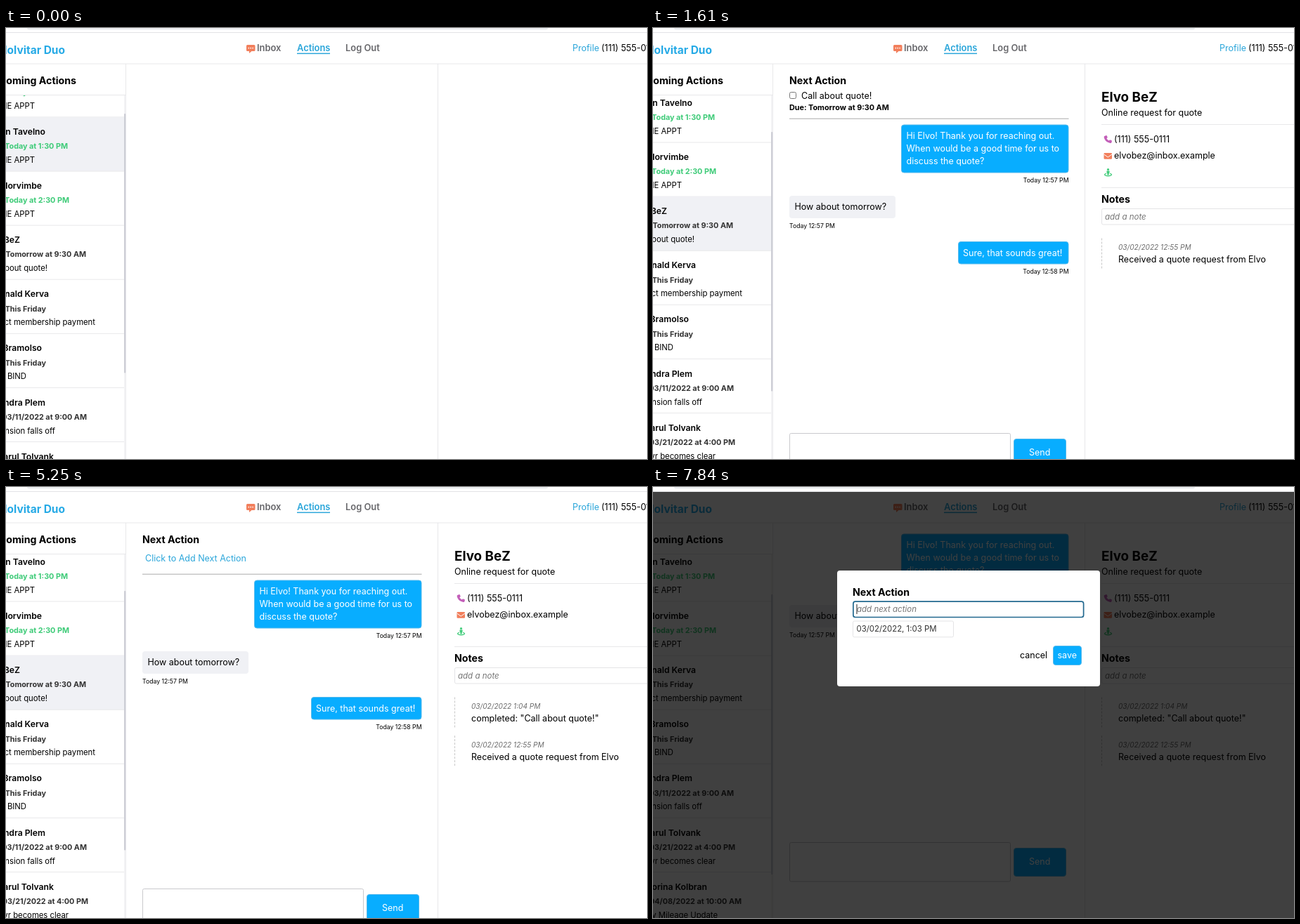
Recreate the animation shown at these times as an HTML page. Size 912 by 614 pixels, loop 8000 ms.

```html
<!DOCTYPE html>
<html lang="en">
<head>
<meta charset="utf-8">
<title>Upcoming actions</title>
<style>
  html, body { margin: 0; width: 100%; height: 100%; overflow: hidden; background: #fff; }
  svg { display: block; width: 912px; height: 614px; font: 12.5px Inter, sans-serif; }
  .nav { font-size: 12.9px; font-weight: 600; fill: #68686c; }
  .brand { font-size: 15.5px; font-weight: 700; fill: #26aae6; }
  .head { font-size: 14.2px; font-weight: 700; }
  .contact { font-size: 18.8px; font-weight: 700; }
  .name { font-size: 12.2px; font-weight: 600; }
  .due { font-size: 10.8px; font-weight: 700; fill: #333; }
  .today { fill: #3ecb78; }
  .memo { font-size: 11.3px; }
  .deadline { font-size: 10.8px; font-weight: 700; }
  .time { font-size: 8.7px; }
  .hint { font-size: 11.5px; font-style: italic; fill: #757575; }
  .date { font-size: 10.1px; font-style: italic; fill: #6c6c6c; }
  .field { font-size: 11.4px; fill: #333; }
  .link { fill: #2ba6da; }
  .white { fill: #fff; }
  .end { text-anchor: end; }
</style>
</head>
<body>
<svg id="stage" viewBox="0 0 912 614"></svg>
<script>
const LOOP = 8000, STEP = 70, PITCH = 77.1;
const BLUE = '#08adff', EDGE = '#55b9ec', PALE = '#f0f1f5', FOCUS = '#23698f', RULE = '#e8e8ea';

// name, due, memo, each followed by its right edge
const actions = [
  ['Olma Reskin', 50, 'Today at 11:00 AM', 94, 'PHONE APPT', 41],
  ['Mirun Tavelno', 56, 'Today at 1:30 PM', 88, 'PHONE APPT', 41],
  ['Ada Norvimbe', 51, 'Today at 2:30 PM', 90, 'PHONE APPT', 41],
  ['Elvo BeZ', 20, 'Tomorrow at 9:30 AM', 114, 'Call about quote!', 59],
  ['Jornald Kerva', 61, 'This Friday', 57, 'Collect membership payment', 127],
  ['Tia Bramolso', 51, 'This Friday', 57, 'READY TO BIND', 29],
  ['Pelondra Plem', 56, '03/11/2022 at 9:00 AM', 115, 'Suspension falls off', 70],
  ['Karul Tolvank', 68, '03/21/2022 at 4:00 PM', 117, 'When mvr becomes clear', 89],
  ['Sorina Kolbran', 77, '04/08/2022 at 10:00 AM', 126, 'Yearly Mileage Update', 92]
];
const CALL = 3;

const text = (x, y, s, cls = '') => `<text x="${x}" y="${y}" class="${cls}">${s}</text>`;
const rect = (x, y, w, h, fill, r = 0, extra = '') =>
  `<rect x="${x}" y="${y}" width="${w}" height="${h}" rx="${r}" fill="${fill}" ${extra}/>`;
const line = (x1, y1, x2, y2, color = RULE, extra = '') =>
  `<path d="M${x1} ${y1}L${x2} ${y2}" stroke="${color}" ${extra}/>`;
const outline = (x, y, w, h, color, width = 1, r = 3) =>
  rect(x, y, w, h, '#fff', r, `stroke="${color}" stroke-width="${width}"`);
const bluePanel = (x, y, w, h) =>
  rect(x + .5, y + .5, w - 1, h - 1, BLUE, 3.5, `stroke="${EDGE}"`);
const input = (x, y, w, h, focused) =>
  focused ? outline(x + .4, y + .2, w - .8, h - .4, FOCUS, 1.7) : outline(x, y, w, h, '#e4e4e6', 1, 2);
const group = (x, y, body) => `<g transform="translate(${x} ${y})">${body}</g>`;
const caret = (x, y) => rect(x, y, 1, 14, '#222');
const clamp = v => Math.max(0, Math.min(1, v));

const chatIcon = group(342, 24,
  '<path d="M1.5 0H11Q12.5 0 12.5 1.5V7.5Q12.5 9 11 9H7.5L4 12V9H1.5Q0 9 0 7.5V1.5Q0 0 1.5 0Z" fill="#f27f5c"/>' +
  [3.3, 6.2, 9.1].map(x => `<circle cx="${x}" cy="4.6" r=".9" fill="#fff"/>`).join(''));
const phoneIcon = group(641, 153,
  '<path d="M2.5.5L4.5 0 5.8 3 4.4 4.2Q5.5 6.6 7.8 7.6L9 6.2 12 7.5 11.5 9.8Q11.2 11.5 9.5 11 1.5 9.5.6 2.3.5 1 2.5.5Z" fill="#c35fb9"/>');
const mailIcon = group(641.5, 178,
  rect(0, 0, 11.5, 8.8, '#f27f5c', 1.2) +
  '<path d="M0 2L5.75 6 11.5 2" fill="none" stroke="#fff"/>');
const placeIcon = group(647.5, 200,
  '<g fill="#3ecb78"><circle cy="1.5" r="1.6"/><path d="M-2 3.6H2V6.6H1.2V9.6H-1.2V6.6H-2Z"/></g>' +
  '<path d="M-2.6 7.4C-7 8.4-5 10.8 0 10.8S7 8.4 2.6 7.4" fill="none" stroke="#3ecb78" stroke-width="1.2"/>');

const header =
  rect(30, -6, 741, 8.5, '#eceef1', 3) + line(0, 6.5, 912, 6.5, '#e2e3e6') +
  text(84, 37, 'Holvitar Duo', 'brand end') + chatIcon +
  text(357, 33, 'Inbox', 'nav') + text(414, 33, 'Actions', 'nav link') +
  text(483, 33, 'Log Out', 'nav') + rect(414, 35.6, 47, 1.5, '#2ba6da') +
  text(806, 33, 'Profile', 'link') + text(847, 33, '(111) 555-0111') +
  line(0, 51, 912, 51) + line(170.5, 51, 170.5, 614) + line(614.5, 51, 614.5, 614) +
  text(100, 80, 'Upcoming Actions', 'head end') + line(0, 95.5, 170, 95.5);

function actionList(t) {
  const scroll = 41 * (1 - (1 - Math.min(9, Math.floor(t / STEP)) / 9) ** 1.5);
  const removed = t >= 6160;
  const moved = clamp((Math.floor(t / STEP) - 14) / 3);
  const hover = i => removed ? 0
    : i === 1 ? +(scroll < 20)
    : i === 2 ? (scroll < 20 ? 0 : 1 - moved)
    : i === CALL ? moved : 0;
  const rows = actions.map((a, i) => [a, hover(i)])
    .filter((_, i) => !(removed && i === CALL))
    .map(([[name, nameX, due, dueX, memo, memoX], shade], i) => {
      const dueClass = 'due end' + (due.startsWith('Today') ? ' today' : '');
      return group(0, (127 - scroll + (i - 1) * PITCH).toFixed(2),
        (shade ? rect(0, 0, 168, PITCH, PALE, 0, `opacity="${shade}"`) : '') +
        line(0, 77, 168, 77) + text(nameX, 25, name, 'name end') +
        text(dueX, 45.3, 'Due: ' + due, dueClass) + text(memoX, 65, memo, 'memo end'));
    }).join('');
  const thumbY = removed ? 153 : 122 + 26 * scroll / 41;
  return '<clipPath id="list"><rect y="96" width="170" height="518"/></clipPath>' +
    `<g clip-path="url(#list)">${rows}</g>` +
    rect(168, 96, 2.5, 518, '#f2f2f4') +
    rect(168, thumbY, 2.3, removed ? 399 : 369.5, '#cdced6', 1);
}

function checkbox(t) {
  if (t >= 4200) return rect(194, 91, 10, 10, '#0075ff', 2) +
    '<path d="M196 96L198.2 98.2 202 93.6" fill="none" stroke="#fff" stroke-width="1.5"/>';
  return outline(194.5, 91.5, 9, 9, t >= 3920 ? '#4f4f4f' : '#767676', 1, 2);
}

function conversation(t, modal) {
  const done = t >= 5250;
  const task = modal ? '' : text(194, 80, 'Next Action', 'head') + (done
    ? text(198, 106, 'Click to Add Next Action', 'link')
    : checkbox(t) + text(211, 101, 'Call about quote!') +
      text(194, 117, 'Due: Tomorrow at 9:30 AM', 'deadline'));
  return task + group(0, modal ? -71 : done ? -5 : 0,
    (modal ? '' : line(194, 129.2, 591.5, 129.2, '#aaa')) +
    bluePanel(353, 137.5, 238.5, 69) +
    text(360.5, 158, 'Hi Elvo! Thank you for reaching out.', 'white') +
    text(360.5, 176, 'When would be a good time for us to', 'white') +
    text(360.5, 194, 'discuss the quote?', 'white') +
    text(591.5, 219.7, 'Today 12:57 PM', 'time end') +
    rect(194, 239, 151, 32, PALE, 4) + text(201.5, 259.3, 'How about tomorrow?') +
    text(194, 285, 'Today 12:57 PM', 'time') +
    bluePanel(434, 304, 157.5, 32.5) + text(441, 324.7, 'Sure, that sounds great!', 'white') +
    text(591.5, 350, 'Today 12:58 PM', 'time end') +
    outline(194.5, 577.5, 314, 55.5, '#c9c9cd', 1, 2) +
    bluePanel(513, 585, 75, 41) + text(535, 609.4, 'Send', 'white'));
}

function contactPanel(t) {
  const focused = t >= 2730 && t < 4130;
  const blink = focused && (t < 3290 || t >= 3780);
  const notes = [['12:55 PM', 'Received a quote request from Elvo']];
  if (t >= 5250) notes.unshift(['1:04 PM', 'completed: "Call about quote!"']);
  return text(638, 104.5, 'Elvo BeZ', 'contact') + text(638, 125, 'Online request for quote') +
    line(638, 137.5, 912, 137.5) + phoneIcon + text(656, 163, '(111) 555-0111') +
    mailIcon + text(656, 186, 'elvobez@inbox.example') + placeIcon +
    line(638, 227.5, 912, 227.5) + text(638, 249, 'Notes', 'head') +
    input(638.5, 257.5, 290, 22.5, focused) +
    text(643, 272.8, 'add a note', 'hint') + (blink ? caret(643, 261.5) : '') +
    notes.map(([time, note], i) => group(638.5, i * 54.7,
      line(0, 299.5, 0, 343, '#c8c8c8', 'stroke-dasharray="3 2"') +
      text(23.5, 316.3, '03/02/2022 ' + time, 'date') + text(23.5, 334.4, note))).join('');
}

function dialog(t) {
  const focused = t >= 7840;
  return rect(0, 7, 912, 607, '#000', 0, 'opacity=".75"') +
    rect(262, 119, 374, 165, '#fff', 4) + text(284, 155, 'Next Action', 'head') +
    input(284.5, 163, 328.5, 22.7, focused) +
    text(290, 178.3, 'add next action', 'hint') + (focused ? caret(289.5, 167) : '') +
    outline(284.5, 191, 143, 22.8, '#e4e4e6', 1, 2) + text(289.5, 206.2, '03/02/2022, 1:03 PM', 'field') +
    text(522, 244.2, 'cancel') + bluePanel(569, 226, 41, 28) + text(575.5, 244.2, 'save', 'white');
}

function scene(t) {
  const open = t >= 1470, modal = t >= 7280;
  return header + actionList(t) +
    (open ? conversation(t, modal) + contactPanel(t) : '') +
    (modal ? dialog(t) : '');
}

const stage = document.getElementById('stage');
let shown = '';
function tick() {
  const next = scene(performance.now() % LOOP);
  if (next !== shown) stage.innerHTML = shown = next;
  requestAnimationFrame(tick);
}
tick();
</script>
</body>
</html>
```
